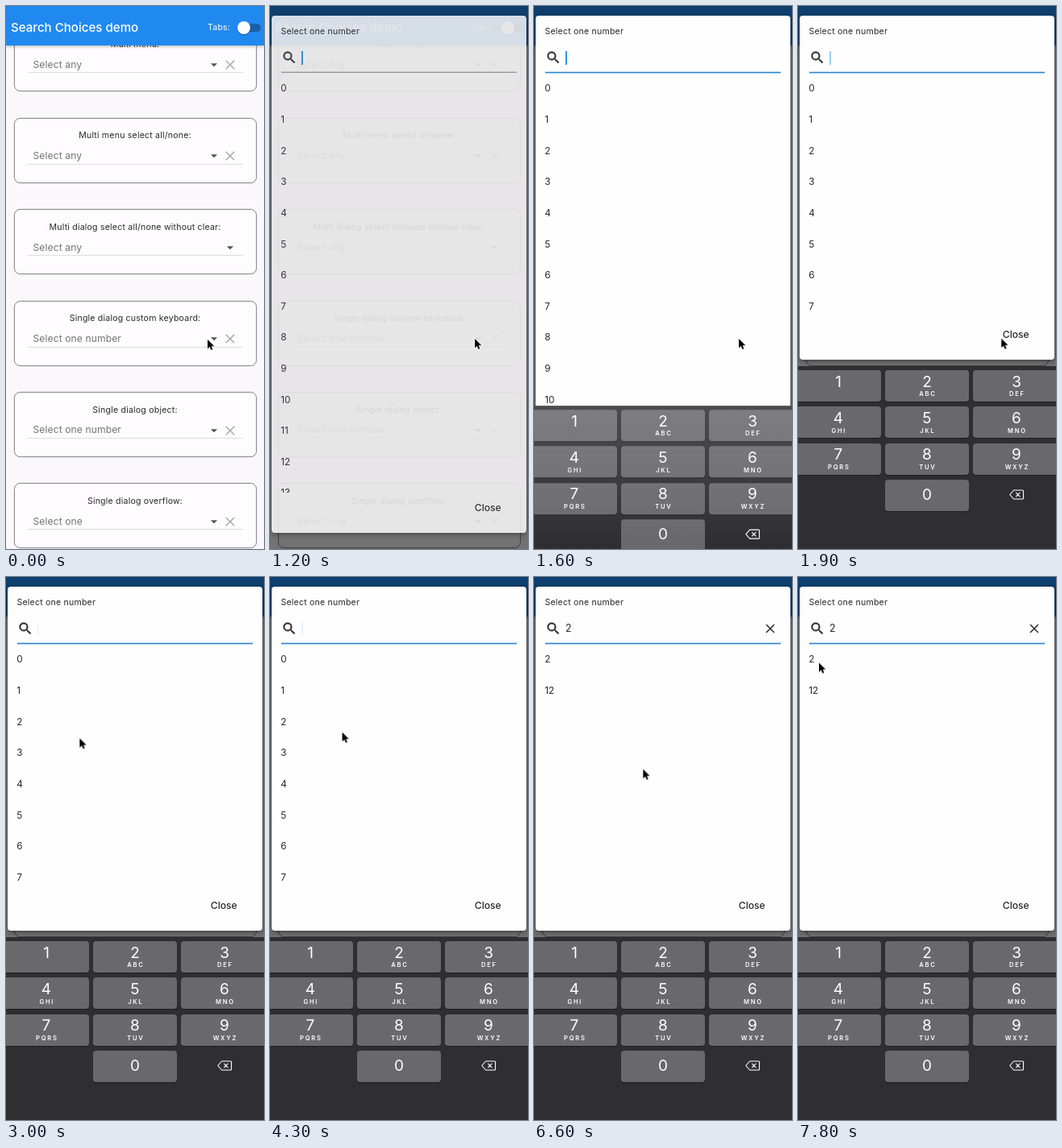
An HTML page for the animation above (8000 ms loop, 320x674 px).

```html
<!DOCTYPE html>
<html lang="en">
<head>
<meta charset="utf-8">
<title>Search Choices demo</title>
<style>
html, body { margin: 0; width: 100%; height: 100%; overflow: hidden; }
body { position: relative; background: #faf8fb; color: #29282b; font-family: Inter, Roboto, "Liberation Sans", sans-serif; }
#stage { position: absolute; left: 0; top: 0; width: 320px; height: 674px; overflow: hidden; background: #faf8fb; }
#stage * { position: absolute; box-sizing: border-box; }
svg { overflow: visible; }

/* text, placed by the middle of its line */
.t { white-space: nowrap; line-height: 20px; margin-top: -10px; font-size: 10.6px; letter-spacing: .19px; }
.mid { transform: translateX(-50%); }
.hint { font-size: 12.1px; letter-spacing: .1px; color: #747376; }
.row { font-size: 11.8px; letter-spacing: 0; }

header { left: 0; top: 0; width: 320px; height: 49px; background: #2089f0; color: #fff; box-shadow: 0 1px 4px rgba(0,0,0,.3); }
header .title { left: 6px; top: 27px; font-size: 15.1px; font-weight: 500; letter-spacing: 0; }
.track { left: 290px; top: 21.5px; width: 25.5px; height: 10.5px; border-radius: 6px; background: #175fa9; }
.thumb { left: 287px; top: 19px; width: 16px; height: 16px; border-radius: 50%; background: #fdfcfd; box-shadow: 0 1px 2px rgba(0,0,0,.35); }

.card { left: 10.5px; width: 299px; height: 79px; }
.frame { left: 0; top: 0; width: 299px; height: 79px; fill: #fefcfe; stroke: #858387; filter: drop-shadow(0 .6px .5px rgba(0,0,0,.18)); }
.card .line { left: 16px; top: 56px; width: 267px; height: 1px; background: #dfdde0; }
.icon { width: 18px; height: 18px; }

/* one loop lasts 8s, so 1.25% is 100ms */
#barrier, #dialog, #keyboard, #pointer, .field rect, .empty, .typed, .solid, .veil, .pressed { animation: 8s linear infinite; }
#barrier { inset: 0; background: rgba(0,0,0,.54); animation-name: barrier; animation-timing-function: step-end; }
@keyframes barrier { 0% { opacity: 0 } 15%, 100% { opacity: 1 } }

#dialog { left: 2px; top: 12px; width: 316px; border-radius: 4px; background: #fffeff; box-shadow: 0 2px 6px rgba(0,0,0,.45); overflow: hidden; animation-name: fade, shrink; animation-timing-function: step-end, linear; }
@keyframes fade { 0% { opacity: 0 } 15% { opacity: .83 } 17.5%, 100% { opacity: 1 } }
@keyframes shrink { 0%, 20.25% { height: 642px } 21.25% { height: 482px } 22.25%, 100% { height: 427px } }
.field { left: 12px; top: 69px; width: 292px; height: 3px; }
.field rect { animation-name: focus; animation-timing-function: step-end; }
@keyframes focus { 0% { height: .9px; fill: #6f6d72 } 17.5%, 100% { height: 1.6px; fill: #2583d4 } }
.list { left: 0; top: 72px; bottom: 50px; width: 316px; overflow: hidden; }
.close { left: 251.7px; bottom: 21px; margin: 0; font-size: 12.2px; font-weight: 500; letter-spacing: 0; }

.layer { inset: 0; }
.empty { animation-name: before; animation-timing-function: step-end; }
.typed { animation-name: after; animation-timing-function: step-end; }
@keyframes before { 0% { visibility: visible } 71.6%, 100% { visibility: hidden } }
@keyframes after { 0% { visibility: hidden } 71.6%, 100% { visibility: visible } }

.caret { top: 44px; width: 1.6px; height: 17px; background: #2c95dc; }
.empty .caret { left: 37px; }
.typed .caret { left: 45.5px; }
.blink { animation: blink 1s linear infinite; }
.empty .blink { animation-delay: -.23s; }
.typed .blink { animation-delay: -.62s; }
@keyframes blink { 0% { opacity: 1 } 25%, 50% { opacity: 0 } 75%, 100% { opacity: 1 } }
.solid { animation-timing-function: step-end; }
.empty .solid { animation-name: firstHold; }
.typed .solid { animation-name: typeHold; }
@keyframes firstHold { 0% { opacity: 1 } 22.125%, 100% { opacity: 0 } }
@keyframes typeHold { 0% { opacity: 1 } 79.75%, 100% { opacity: 0 } }

#keyboard { left: 0; top: 447px; width: 320px; height: 227px; background: #2f2e31; color: #fff; animation-name: rise; }
@keyframes rise {
  0%, 17.25% { transform: translateY(230px) }
  17.5% { transform: translateY(220px) }
  18.75% { transform: translateY(117px) }
  20% { transform: translateY(49.5px) }
  21.25% { transform: translateY(16px) }
  22.5% { transform: translateY(5px) }
  23.75%, 100% { transform: none }
}
.key { height: 39px; border-radius: 4px; background: #69686b; box-shadow: 0 1px 0 #1d1c1f; }
.pressed { animation-name: press; animation-timing-function: step-end; }
@keyframes press { 0% { background: #69686b } 70% { background: #48474a } 71.6%, 100% { background: #69686b } }
.digit { font-size: 19px; letter-spacing: 0; }
.abc { font-size: 7.6px; font-weight: 600; letter-spacing: 1.7px; text-indent: 1.7px; }
.veil { inset: 0; background: linear-gradient(rgba(255,255,255,.15), rgba(255,255,255,0) 80%); animation-name: veil; }
@keyframes veil { 0%, 20% { opacity: 1 } 22.5%, 100% { opacity: 0 } }

#pointer { left: 0; top: 0; width: 9px; height: 14px; animation-name: point; }
@keyframes point {
  0%, 1.25% { transform: translate(250px, 414px) }
  5%, 21.25% { transform: translate(254px, 413px) }
  23.75% { transform: translate(252.5px, 413px) }
  25% { transform: translate(225px, 386px) }
  26.25% { transform: translate(180px, 345px) }
  27.5% { transform: translate(137px, 302px) }
  31.25% { transform: translate(112px, 254px) }
  35% { transform: translate(95px, 213px) }
  38.75% { transform: translate(89.5px, 194px) }
  41.25%, 53.75% { transform: translate(89.5px, 192.5px) }
  55% { transform: translate(92px, 215px) }
  57.5% { transform: translate(115px, 350px) }
  60% { transform: translate(138px, 470px) }
  61.25% { transform: translate(143px, 494px) }
  63.75% { transform: translate(145px, 482px) }
  66.25% { transform: translate(149px, 473px) }
  68.75%, 78.75% { transform: translate(151px, 470px) }
  80% { transform: translate(150px, 425px) }
  82.5% { transform: translate(135.5px, 239px) }
  85% { transform: translate(95px, 162px) }
  87.5% { transform: translate(45px, 120px) }
  90% { transform: translate(28px, 110px) }
  92.5% { transform: translate(26px, 109px) }
  97.5%, 100% { transform: translate(26px, 106.5px) }
}
</style>
</head>
<body>
<div id="stage">
  <div id="cards"></div>
  <header>
    <span class="t title">Search Choices demo</span>
    <span class="t" style="left:250px;top:27px">Tabs:</span>
    <i class="track"></i><i class="thumb"></i>
  </header>
  <div id="barrier"></div>
  <div id="dialog">
    <span class="t" style="left:11.5px;top:19.5px">Select one number</span>
    <svg style="left:11.6px;top:41.8px;width:20px;height:20px" viewBox="0 0 24 24" fill="#29282b" stroke="#29282b" stroke-width=".4"><path d="M15.5 14h-.79l-.28-.27A6.47 6.47 0 0 0 16 9.5 6.5 6.5 0 1 0 9.5 16c1.61 0 3.09-.59 4.23-1.57l.27.28v.79l5 4.99L20.49 19zm-6 0a4.5 4.5 0 1 1 0-9 4.5 4.5 0 0 1 0 9z"/></svg>
    <svg class="field"><rect y=".75" width="292"/></svg>
    <div class="layer empty">
      <i class="caret blink"></i><i class="caret solid"></i>
      <div class="list" id="all"></div>
    </div>
    <div class="layer typed">
      <span class="t" style="left:37px;top:51.5px;font-size:12.5px">2</span>
      <i class="caret blink"></i><i class="caret solid"></i>
      <svg class="icon" style="left:282px;top:42.5px" viewBox="0 0 24 24" stroke="#29282b" stroke-width="2"><path d="M5.4 5.4 18.6 18.6M18.6 5.4 5.4 18.6"/></svg>
      <div class="list" id="found"></div>
    </div>
    <span class="t close">Close</span>
  </div>
  <div id="keyboard">
    <svg style="left:262px;top:153px;width:18px;height:13px" viewBox="0 0 18 13" fill="none" stroke="#fff" stroke-width="1.1" stroke-linejoin="round" stroke-linecap="round"><path d="M5.6 1H16.5Q17.5 1 17.5 2V11Q17.5 12 16.5 12H5.6L.8 6.5ZM8.5 4.2l4.6 4.6M13.1 4.2l-4.6 4.6"/></svg>
  </div>
  <svg id="pointer" viewBox="0 0 9 14"><path d="M0 0V11.6L2.7 9.1 4.4 13.1 6.4 12.2 4.7 8.3H8.3Z" fill="#050505" stroke="#fff" stroke-width="1.6" stroke-linejoin="round" paint-order="stroke"/></svg>
</div>
<script>
const byId = id => document.getElementById(id);
const text = (cls, x, y, s) => `<span class="t ${cls}" style="left:${x}px;top:${y}px">${s}</span>`;
const icon = (x, body) => `<svg class="icon" style="left:${x - 18.5}px;top:37.6px" viewBox="0 0 24 24">${body}</svg>`;
const arrow = x => icon(x, '<path fill="#525055" d="M6.6 9.7h10.8L12 15.1z"/>');
const cross = x => icon(x, '<path stroke="#a9a7ab" stroke-width="1.9" d="M5 5 19 19M19 5 5 19"/>');

const cards = [
  ['Multi menu:', 'Select any'],
  ['Multi menu select all/none:', 'Select any'],
  ['Multi dialog select all/none without clear:', 'Select any', true],
  ['Single dialog custom keyboard:', 'Select one number'],
  ['Single dialog object:', 'Select one number'],
  ['Single dialog overflow:', 'Select one']
];
byId('cards').innerHTML = cards.map(([label, hint, noClear], i) =>
  `<div class="card" style="top:${26.4 + 113.4 * i}px">` +
  '<svg class="frame"><rect x="-.6" y="-.6" width="300.2" height="80.2" rx="7.2"/></svg>' +
  text('mid', 149.5, 21.6, label) + text('hint', 23, 46.4, hint) +
  (noClear ? arrow(276.5) : arrow(257) + cross(276.5)) +
  '<i class="line"></i></div>').join('');

const rows = nums => nums.map((n, i) => text('row', 11.2, 18.4 + 38.62 * i, n)).join('');
byId('all').innerHTML = rows([...Array(14).keys()]);
byId('found').innerHTML = rows([2, 12]);

const letters = ['', 'ABC', 'DEF', 'GHI', 'JKL', 'MNO', 'PQRS', 'TUV', 'WXYZ'];
const cols = [[-3, 106, 50], [108, 104, 160], [217, 108, 271]];
function key(digit, col, row, sub, y) {
  const [x, w, mid] = cols[col];
  return `<div class="key${digit === 2 ? ' pressed' : ''}" style="left:${x}px;top:${5.2 + 45.15 * row}px;width:${w}px">` +
    text('digit mid', mid - x, y, digit) + text('abc mid', mid - x, 30.3, sub) + '</div>';
}
byId('keyboard').insertAdjacentHTML('beforeend',
  letters.map((s, i) => key(i + 1, i % 3, Math.floor(i / 3), s, 14.5)).join('') +
  key(0, 1, 3, '', 19) + '<i class="veil"></i>');
</script>
</body>
</html>
```
